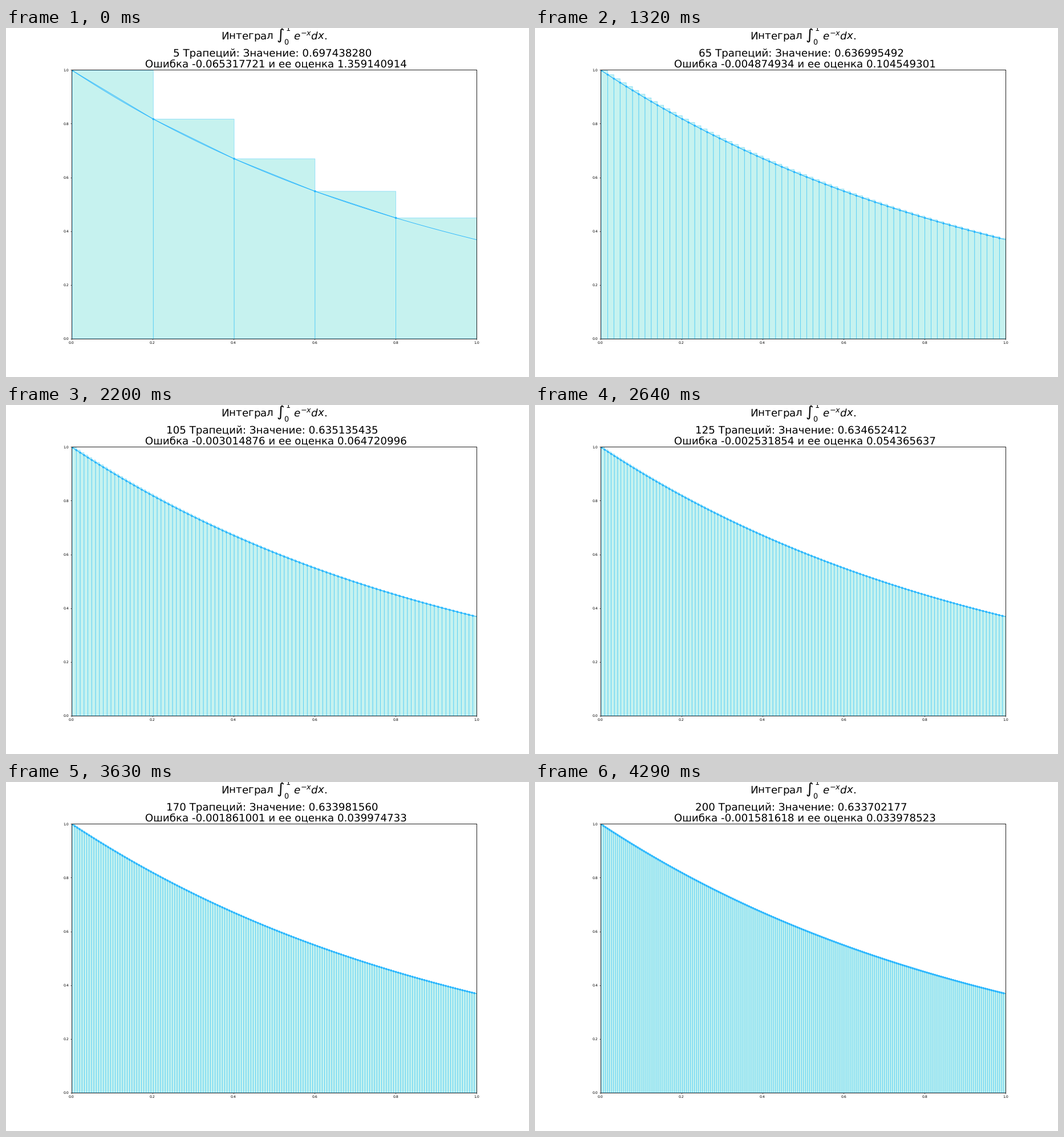
Animation, 917 px wide and 611 px high, one loop 4.4 s. Source, as a matplotlib script:

```python
import numpy as np
import matplotlib.pyplot as plt
from matplotlib.animation import FuncAnimation
from matplotlib.collections import EllipseCollection, PolyCollection

W, H, DPI = 917, 611, 64
PX = 72 / DPI            # points per pixel
FRAMES, STEP = 40, 5
X0 = 0.0027              # where the sampled grid begins
EXACT = 1 - np.exp(-1)
BLUE = "#28b6ff"

plt.rcParams.update({
    "font.family": "DejaVu Sans",
    "mathtext.fontset": "dejavusans",
    "text.hinting": "none",
})


def f(x):
    return np.exp(-x)


def left_sum(n):
    return f(np.arange(n) / n).sum() / n


def title_text(n):
    value = left_sum(n)
    return (
        r"Интеграл $\int_0^1\ e^{-x}dx$." + "\n"
        f"{n} Трапеций: Значение: {value:.9f} \n"
        f" Ошибка {EXACT - value:.9f} и ее оценка {2.5 * np.e / n:.9f}"
    )


fig, ax = plt.subplots(figsize=(W / DPI, H / DPI), dpi=DPI)
fig.subplots_adjust(left=0.125, right=0.9, bottom=0.11, top=0.88)
ax.set(xlim=(0, 1), ylim=(0, 1))
ax.tick_params(labelsize=6.07 * PX, length=2.1 * PX, width=0.8 * PX,
               pad=2.12 * PX, color="#333333")
for spine in ax.spines.values():
    spine.set(linewidth=PX, edgecolor="#222222")
title = ax.set_title("", fontsize=18.2 * PX, pad=3.64 * PX)

bars = PolyCollection([], facecolors=(0.27, 0.83, 0.80, 0.3),
                      edgecolors=(0, 0.71, 1, 0.38),
                      linewidths=0.85 * PX, snap=False, zorder=1)
ax.add_collection(bars, autolim=False)

grid = np.linspace(X0, 1, 400)
ax.plot(grid, f(grid), color=BLUE, lw=0.91 * PX)
chords, = ax.plot([], [], color=BLUE, lw=0.91 * PX)

# Two equal sizes keep the dots at sub-pixel positions.
size = [3.7 * PX] * 2
dots = EllipseCollection(size, size, [0, 0], units="points",
                         offsets=np.empty((0, 2)),
                         offset_transform=ax.transData,
                         facecolors=BLUE, linewidths=0, zorder=2.1)
ax.add_collection(dots, autolim=False)


def update(i):
    n = STEP * (i + 1)
    edges = np.linspace(X0, 1, n + 1)
    x, y = edges[:-1], f(edges[:-1])
    bars.set_verts([[(a, 0), (a, h), (b, h), (b, 0)]
                    for a, b, h in zip(x, edges[1:], y)])
    chords.set_data(x, y)
    dots.set_offsets(np.column_stack([x, y]))
    title.set_text(title_text(n))
    return bars, chords, dots, title


anim = FuncAnimation(fig, update, frames=FRAMES, interval=110,
                     repeat=True, repeat_delay=0, blit=False)
plt.show()
```
